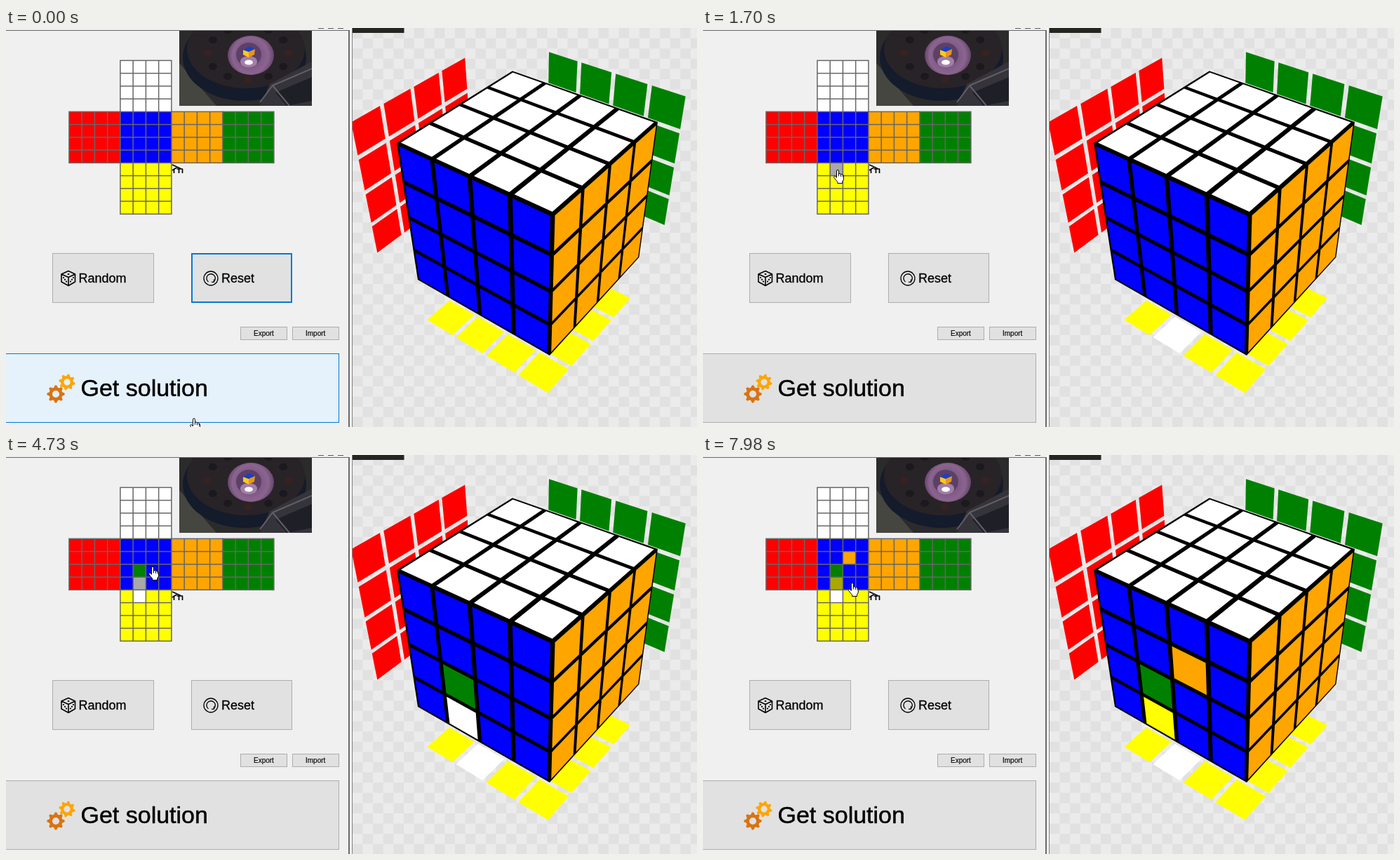
Recreate the animation shown at these times as an HTML page with a canvas. Size 985 px wide and 569 px high, loop 8000 ms.

```html
<!DOCTYPE html>
<html lang="en">
<head>
<meta charset="utf-8">
<title>Cube editor</title>
<style>
html, body { margin: 0; width: 100%; height: 100%; overflow: hidden; background: #f0f0f0; }
canvas { display: block; }
</style>
</head>
<body>
<canvas id="stage" width="985" height="569"></canvas>
<script>
const ctx = document.getElementById('stage').getContext('2d');
const LOOP = 8000, TICK = 78, SPEED = 55;
const GAP = 0.06, FLOAT = 1.37;
const NET_X = 162.9, NET_Y = 119.35, PITCH = 18.25, LINE = 1.5;
const CHECK = 14.6;
const FONT = '"Liberation Sans", Arial, sans-serif';

const CYCLE = ['white', 'red', 'blue', 'orange', 'green', 'yellow'];
const RGB = {
  white: [255, 255, 255], red: [255, 0, 0], blue: [0, 0, 255],
  orange: [255, 165, 0], green: [0, 128, 0], yellow: [255, 255, 0]
};

// net: place in the flat layout; at: cell coordinates to cube space
const FACES = {
  L: { color: 'red', net: [-1, 0], at: (c, r) => [FLOAT, r, 1 - c] },
  B: { color: 'green', net: [2, 0], at: (c, r) => [c, r, FLOAT] },
  D: { color: 'yellow', net: [0, 1], at: (c, r) => [1 - c, FLOAT, r] },
  U: { color: 'white', net: [0, -1], at: (c, r) => [1 - c, 0, 1 - r] },
  F: { color: 'blue', net: [0, 0], at: (c, r) => [1 - c, r, 0] },
  R: { color: 'orange', net: [1, 0], at: (c, r) => [0, r, c] }
};

// pointer stops: departure time, column and row in net cells
const START = [5.7, 24];
const STOPS = [
  [220, 1.27, 5.62], [840, 1.54, 4.58], [1780, 1.54, 2.77], [3030, 1.59, 3.7],
  [4730, 2.47, 2.22], [4810, 2.58, 1.24], [5970, 1.59, 0.69],
  [6980, 0.55, 4.85], [7220, 1.54, 3.54], [7980, 2.68, 3.49]
];

// net: click time; view: 3D refresh; step: left click +1, right click -1
const CLICKS = [
  { net: 1320, view: 1700, step: 1 },
  { net: 2470, view: 3850, step: 1 },
  { net: 2940, view: 3850, step: 1 },
  { net: 3560, view: 4020, step: -1 },
  { net: 4250, view: 4470, step: -1 },
  { net: 5590, view: 5890, step: 1 },
  { net: 7600, view: 7920, step: -1 }
];

const BUTTONS = [
  { box: [66, 321, 145, 71], text: 'Random', x: 103.5, size: 18 },
  { box: [264, 321, 144, 71], text: 'Reset', x: 307, size: 18, focus: true },
  { box: [334, 426, 67, 19], text: 'Export', x: 353, size: 10 },
  { box: [408, 426, 67, 19], text: 'Import', x: 427, size: 10 },
  { box: [-6, 464, 481, 99], text: 'Get solution', x: 106.5, size: 34 }
];

const HAND = new Path2D('M4.5 11.5V2Q4.5 .5 6 .5Q7.5 .5 7.5 2V6.5Q8 5.5 9 5.7Q10.3 5.8 10.5 7' +
  'Q11.2 6.2 12 6.5Q13.2 6.8 13.2 8Q14.5 7.5 14.5 9.5V13Q14.5 15 12.8 17V19.5H5.8V17.5' +
  'Q3.5 15 1 11.5Q0 9.8 1.5 9.3Q3 9 4.5 11.5Z');

const css = (name, k = 1) => 'rgb(' + RGB[name].map(v => Math.round(v * k)) + ')';
const inside = ([px, py], x, y, w, h) => px >= x && px < x + w && py >= y && py < y + h;

function rect(color, x, y, w, h) {
  ctx.fillStyle = color;
  ctx.fillRect(x, y, w, h);
}

function poly(color, pts) {
  ctx.fillStyle = color;
  ctx.beginPath();
  pts.forEach(p => ctx.lineTo(p[0], p[1]));
  ctx.closePath();
  ctx.fill();
}

function oval(color, x, y, rx, ry = rx) {
  ctx.fillStyle = color;
  ctx.beginPath();
  ctx.ellipse(x, y, rx, ry, 0, 0, 7);
  ctx.fill();
}

function line(d, color, width) {
  ctx.strokeStyle = color;
  ctx.lineWidth = width;
  ctx.stroke(new Path2D(d));
}

function clipped(x, y, w, h, paint) {
  ctx.save();
  ctx.beginPath();
  ctx.rect(x, y, w, h);
  ctx.clip();
  paint();
  ctx.restore();
}

// perspective of a unit cube: u left, v down, w back from the near top corner
function project([u, v, w]) {
  const d = 1 + 0.147 * u + 0.2096 * v + 0.193 * w;
  return [(780 - 141.1 * u + 157.4 * v + 328.3 * w) / d,
          (266 - 77.9 * u + 298.9 * v - 106.1 * w) / d];
}

const netPoint = (c, r) => [NET_X + c * PITCH, NET_Y + r * PITCH];

function fingertip(t) {
  let [x, y] = netPoint(...START);
  for (const [t0, c, r] of STOPS) {
    if (t < t0) break;
    const [tx, ty] = netPoint(c, r);
    const ticks = Math.ceil(Math.hypot(tx - x, ty - y) / SPEED);
    const k = Math.min(1, (Math.floor((t - t0) / TICK) + 1) / ticks);
    x += (tx - x) * k;
    y += (ty - y) * k;
  }
  return [x, y];
}

function cellAt([x, y]) {
  const c = Math.floor((x - NET_X) / PITCH), r = Math.floor((y - NET_Y) / PITCH);
  const id = Object.keys(FACES).find(f =>
    FACES[f].net[0] === Math.floor(c / 4) && FACES[f].net[1] === Math.floor(r / 4));
  return id && id + ((r + 4) % 4 * 4 + (c + 4) % 4);
}

CLICKS.forEach(k => { k.cell = cellAt(fingertip(k.net)); });

function colorOf(id, i, t, clock) {
  let n = CYCLE.indexOf(FACES[id].color);
  for (const k of CLICKS)
    if (k.cell === id + i && t >= k[clock]) n = (n + k.step + 6) % 6;
  return CYCLE[n];
}

function drawFace(id, t) {
  for (let i = 0; i < 16; i++) {
    const corner = (a, b) => project(FACES[id].at((i % 4 + a) / 4, ((i >> 2) + b) / 4));
    const lo = GAP, hi = 1 - GAP;
    poly(css(colorOf(id, i, t, 'view')),
      [corner(lo, lo), corner(hi, lo), corner(hi, hi), corner(lo, hi)]);
  }
}

function drawView(t) {
  clipped(494, 0, 491, 569, () => {
    rect('#ebebeb', 494, 0, 491, 569);
    for (let j = 0; j * CHECK < 569; j++)
      for (let i = j % 2; i * CHECK < 491; i += 2)
        rect('#e1e1e1', 494 + i * CHECK, j * CHECK, CHECK, CHECK);
    ['L', 'B', 'D'].forEach(f => drawFace(f, t));
    poly('#000', [[1, 0, 1], [0, 0, 1], [0, 1, 1], [0, 1, 0], [1, 1, 0], [1, 0, 0]].map(project));
    ['U', 'F', 'R'].forEach(f => drawFace(f, t));
    rect('#25261f', 494, 0, 73.5, 7);
  });
}

function drawNet(t, hover) {
  const size = PITCH - LINE, half = LINE / 2;
  for (const id in FACES) {
    const [fx, fy] = FACES[id].net;
    const [x0, y0] = netPoint(fx * 4, fy * 4);
    rect('#666', x0 - half, y0 - half, PITCH * 4 + LINE, PITCH * 4 + LINE);
  }
  for (const id in FACES) {
    const [fx, fy] = FACES[id].net;
    for (let i = 0; i < 16; i++) {
      const [x, y] = netPoint(fx * 4 + i % 4, fy * 4 + (i >> 2));
      rect(css(colorOf(id, i, t, 'net'), hover === id + i ? 0.66 : 1), x + half, y + half, size, size);
    }
  }
}

function drawButton(b, t, tip) {
  const [x, y, w, h] = b.box;
  const hover = inside(tip, x, y, w, h), focus = b.focus && t < CLICKS[0].net;
  const edge = focus ? 2 : 1;
  rect(hover || focus ? '#0078d7' : '#adadad', x, y, w, h);
  rect(hover ? '#e5f1fb' : '#e1e1e1', x + edge, y + edge, w - 2 * edge, h - 2 * edge);
  ctx.font = b.size + 'px ' + FONT;
  ctx.fillStyle = ctx.strokeStyle = '#000';
  ctx.lineWidth = b.size * 0.015;
  const base = y + h / 2 + b.size * 0.35;
  ctx.fillText(b.text, b.x, base);
  ctx.strokeText(b.text, b.x, base);
}

function gear(x, y, r, color, turn) {
  ctx.fillStyle = color;
  ctx.beginPath();
  for (let i = 0; i < 32; i++) {
    const a = turn + (i - 0.5) * Math.PI / 16;
    const d = i % 4 < 2 ? r : r * 0.76;
    ctx.lineTo(x + d * Math.cos(a), y + d * Math.sin(a));
  }
  ctx.closePath();
  ctx.moveTo(x + r * 0.4, y);
  ctx.arc(x, y, r * 0.4, 0, 7);
  ctx.fill('evenodd');
}

function drawIcons() {
  ctx.lineJoin = 'round';
  line('M89 346.5L98.5 351V362L89 367.5L79 362V351ZM79 351L89 355.5L98.5 351M89 355.5V367', '#000', 1.6);
  oval('#000', 89, 351, 1.5, 1);
  for (let i = 0; i < 3; i++) {
    oval('#000', 82 + 2 * i, 356 + 2.8 * i, 1.1);
    oval('#000', 96 - 2 * i, 356 + 2.8 * i, 1.1);
  }
  ctx.lineWidth = 1.3;
  ctx.beginPath();
  ctx.arc(292, 357, 10, 0, 7);
  ctx.stroke();
  line('M288.5 362A6.2 6.2 0 1 1 296 361.8M296.5 358.5V362.3H293', '#000', 1.3);
  gear(87, 505, 11.6, '#ffa500', 0.2);
  gear(71, 522, 12.6, '#da730f', 0);
  line('M237 195L249 200.5M237 203L244 198.5M239.5 201V207M243.5 201H252M246.5 201V207M251.5 201V207', '#000', 1.7);
}

function drawPhoto() {
  clipped(247, 4, 189, 107, () => {
    rect('#2b2b2b', 247, 4, 189, 107);
    poly('#45463f', [[247, 50], [300, 111], [247, 111]]);
    oval('#141b2b', 340, 42, 88, 62);
    oval('#282327', 342, 30, 84, 56);
    for (let i = 0; i < 12; i++) {
      const a = i * Math.PI / 6;
      oval(i % 3 ? '#1b191d' : '#372222', 345 + 58 * Math.cos(a), 36 + 38 * Math.sin(a), 6, 5);
    }
    poly('#36343b', [[362, 111], [376, 80], [436, 48], [436, 111]]);
    poly('#1f2027', [[384, 92], [436, 70], [436, 104], [400, 111]]);
    line('M362 106L380 82L436 58M380 82L404 111', '#625e67', 2);
    const glow = ctx.createRadialGradient(347, 40, 8, 349, 39, 33);
    glow.addColorStop(0, '#72507a');
    glow.addColorStop(0.7, '#8b6590');
    glow.addColorStop(1, '#65456b');
    oval(glow, 349, 39, 33, 28);
    oval('#5d4066', 346, 38, 18, 17);
    oval('#a27ea8', 346, 48, 12, 8);
    oval('#fff', 346, 49, 6, 3.5);
    poly('#ffc81c', [[338, 31], [346, 34], [346, 42], [338, 38]]);
    poly('#1840c8', [[338, 31], [347, 26], [355, 30], [346, 34]]);
    poly('#e8961a', [[346, 34], [355, 30], [354, 38], [346, 42]]);
  });
}

function drawPanel(t, tip) {
  rect('#f0f0f0', 0, 0, 494, 569);
  rect('#696969', 0, 3, 490, 1);
  for (let i = 0; i < 3; i++) rect('#55555a', 445 + i * 14, 0, 8, 1);
  rect('#696969', 488, 3, 2, 566);
  rect('#fafafa', 490, 0, 3, 569);
  rect('#808080', 493, 0, 1, 569);
  drawPhoto();
  drawNet(t, cellAt(tip));
  BUTTONS.forEach(b => drawButton(b, t, tip));
  drawIcons();
}

function drawHand([x, y]) {
  ctx.save();
  ctx.translate(x - 5, y - 1);
  ctx.fillStyle = '#fff';
  ctx.fill(HAND);
  ctx.strokeStyle = '#000';
  ctx.lineWidth = 1;
  ctx.stroke(HAND);
  line('M7.5 6V9.5M10.5 7V10M13.2 8V10.5', '#000', 1);
  ctx.restore();
}

function draw(now) {
  const t = now % LOOP;
  // highlights trail the pointer by one tick
  drawPanel(t, fingertip(t - TICK + 8));
  drawView(t);
  drawHand(fingertip(t));
}

const began = performance.now();
function loop() {
  draw(performance.now() - began);
  requestAnimationFrame(loop);
}
loop();
</script>
</body>
</html>
```
